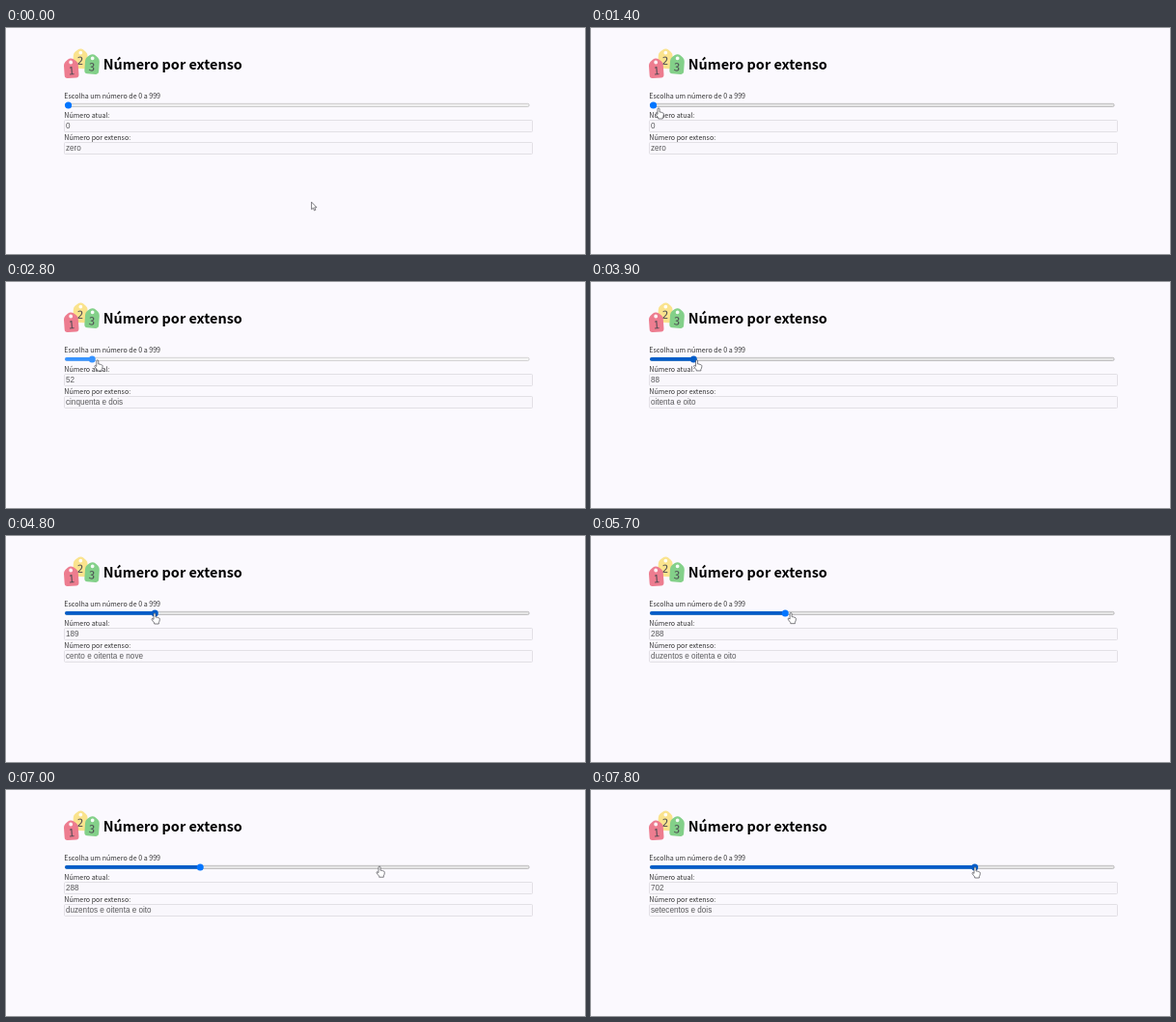
Write an HTML page that moves like this. It is 600 px wide and 234 px high and loops after 8000 ms.

```html
<!DOCTYPE html>
<html lang="pt">
<head>
<meta charset="utf-8">
<title>Número por extenso</title>
<style>
  html, body { margin: 0; width: 100%; height: 100%; overflow: hidden; background: #fbf9fe; }
  svg { display: block; width: 100vw; height: 100vh; }
  .sans { font-family: "Noto Sans CJK JP", "Noto Sans CJK SC", "Noto Sans CJK", "Noto Sans", sans-serif; fill: #333; }
  .label { font-size: 7.07px; }
  .title { font-size: 14.44px; font-weight: 700; fill: #000; }
  .field { font: 8.13px "Liberation Sans", Arial, sans-serif; fill: #5a5a5c; }
  .box { fill: #f9f7fc; stroke: #d8d6dc; stroke-width: .7; }
  .digit { font: 11.5px "Noto Sans CJK JP", "Noto Sans", sans-serif; fill: #4c4a52; text-anchor: middle; }
  .cursor { fill: #fff; stroke: #3c3c42; stroke-width: .65; stroke-linejoin: round; }
</style>
</head>
<body>
<svg viewBox="0 0 600 234">
  <defs>
    <path id="tag" d="M-7.4-3.2Q-7.4-5.6-5.6-7.2L-3-9.4Q0-11.4 3-9.4L5.6-7.2Q7.4-5.6 7.4-3.2V7Q7.4 10 4.4 10H-4.4Q-7.4 10-7.4 7Z"/>
  </defs>

  <g transform="translate(77 32) rotate(3)">
    <use href="#tag" fill="#fae38d"/>
    <circle cy="-6.3" r="1.9" fill="#fffdf5"/>
    <text class="digit" y="6">2</text>
  </g>
  <g transform="translate(89.2 37.6) rotate(4)">
    <use href="#tag" fill="#83d089"/>
    <circle cy="-6.3" r="1.9" fill="#f4fbf5"/>
    <text class="digit" y="7">3</text>
  </g>
  <g transform="translate(67.6 41.8) rotate(-4)">
    <use href="#tag" fill="#ed7c8f"/>
    <circle cy="-6.3" r="1.9" fill="#fdf3f5"/>
    <text class="digit" y="6.6">1</text>
  </g>

  <text class="sans title" x="100.8" y="43">Número por extenso</text>
  <text class="sans label" x="60.3" y="73.2">Escolha um número de 0 a 999</text>

  <rect id="track" x="61.3" y="78.3" width="480.9" height="3.2" rx="1.6" stroke-width=".6"/>
  <rect id="fill" x="61" y="78.1" height="3.6" rx="1.8"/>
  <circle id="thumb" cy="79.9" r="3.5"/>

  <text class="sans label" x="60.3" y="93">Número atual:</text>
  <rect class="box" x="60.5" y="95.5" width="485" height="12" rx="1"/>
  <text class="field" id="digits" x="62" y="104"></text>

  <text class="sans label" x="60.3" y="116.2">Número por extenso:</text>
  <rect class="box" x="60.5" y="118.5" width="485" height="12" rx="1"/>
  <text class="field" id="words" x="62" y="127.2"></text>

  <path id="arrow" class="cursor" d="M0 0V7.6L1.7 6.1L2.9 8.8L4.2 8.2L3.1 5.6H5.4Z"/>
  <path id="hand" class="cursor" d="M-1 1Q-1-.2 0-.2T1 1V4L2.3 4.1L3.6 4.5L4.8 5Q5.4 5.4 5.3 6.4Q5.2 8.4 4.3 9.6V11H-.3V10Q-1.9 8.3-2.9 6.5Q-3.2 5.5-2.2 5.4L-1 6.4Z"/>
</svg>
<script>
const LOOP = 8000, STEP = 100;

// [time, x, y] of the pointer
const path = [
  [200, 316.6, 180.2], [1200, 70, 83], [2000, 70, 83], [2800, 94.8, 81], [3200, 106, 81],
  [3800, 106, 81], [4400, 154, 80], [4800, 154, 80], [5400, 201, 80], [5600, 201, 80],
  [6300, 311, 74], [7200, 398, 80]
];
// [time, value]: drag first, then single clicks
const drag = [[2000, 0], [2300, 14], [2800, 52], [3200, 88]];
const clicks = [[4400, 189], [5400, 288], [7600, 702]];
const presses = [[1900, 3300], [4400, 4700], [5400, 5600], [7600, 7800]];

const units = ["zero", "um", "dois", "três", "quatro", "cinco", "seis", "sete", "oito", "nove",
  "dez", "onze", "doze", "treze", "quatorze", "quinze", "dezesseis", "dezessete", "dezoito", "dezenove"];
const tens = ["", "", "vinte", "trinta", "quarenta", "cinquenta", "sessenta", "setenta", "oitenta", "noventa"];
const hundreds = ["", "cento", "duzentos", "trezentos", "quatrocentos", "quinhentos",
  "seiscentos", "setecentos", "oitocentos", "novecentos"];

function spell(n) {
  if (n === 100) return "cem";
  if (n < 20) return units[n];
  const [names, size] = n < 100 ? [tens, 10] : [hundreds, 100];
  const rest = n % size;
  return names[Math.floor(n / size)] + (rest ? " e " + spell(rest) : "");
}

const linear = k => k;
const smooth = k => k * k * (3 - 2 * k);

function at(keys, t, col, ease) {
  if (t <= keys[0][0]) return keys[0][col];
  for (let i = 1; i < keys.length; i++) {
    const a = keys[i - 1], b = keys[i];
    if (t < b[0]) return a[col] + (b[col] - a[col]) * ease((t - a[0]) / (b[0] - a[0]));
  }
  return keys[keys.length - 1][col];
}

const $ = id => document.getElementById(id);
const set = (id, attrs) => {
  for (const k in attrs) $(id).setAttribute(k, attrs[k]);
};

const blue = { idle: "#0075ff", hover: "#005cc8", active: "#3793ff" };
const grey = { idle: ["#efefef", "#b2b2b2"], hover: ["#e5e5e5", "#a0a0a0"], active: ["#f5f5f5", "#bdbdbd"] };

function draw(t) {
  const x = at(path, t, 1, smooth), y = at(path, t, 2, smooth);
  const click = clicks.filter(c => c[0] <= t).pop();
  const value = click ? click[1] : Math.round(at(drag, t, 1, linear));
  const pos = 64.6 + value / 999 * 474;

  const pressed = presses.some(([a, b]) => t >= a && t < b);
  const onTrack = y > 73 && y < 86;
  const onThumb = onTrack && Math.abs(x - pos) < 4.5;
  const trackState = pressed ? "active" : onTrack ? "hover" : "idle";
  const thumbState = pressed ? "active" : onThumb ? "hover" : "idle";

  const [back, edge] = grey[trackState];
  set("track", { fill: back, stroke: edge });
  set("fill", { width: pos - 61, fill: blue[trackState] });
  set("thumb", { cx: pos, fill: blue[thumbState] });
  $("digits").textContent = value;
  $("words").textContent = spell(value);

  const hand = onTrack && y > 76;
  const place = `translate(${x} ${y})`;
  set("hand", { transform: place, visibility: hand ? "visible" : "hidden" });
  set("arrow", { transform: place, visibility: hand ? "hidden" : "visible" });
}

const start = performance.now();
function tick() {
  const t = (performance.now() - start) % LOOP;
  draw(Math.floor(t / STEP) * STEP);
  requestAnimationFrame(tick);
}
tick();
</script>
</body>
</html>
```
